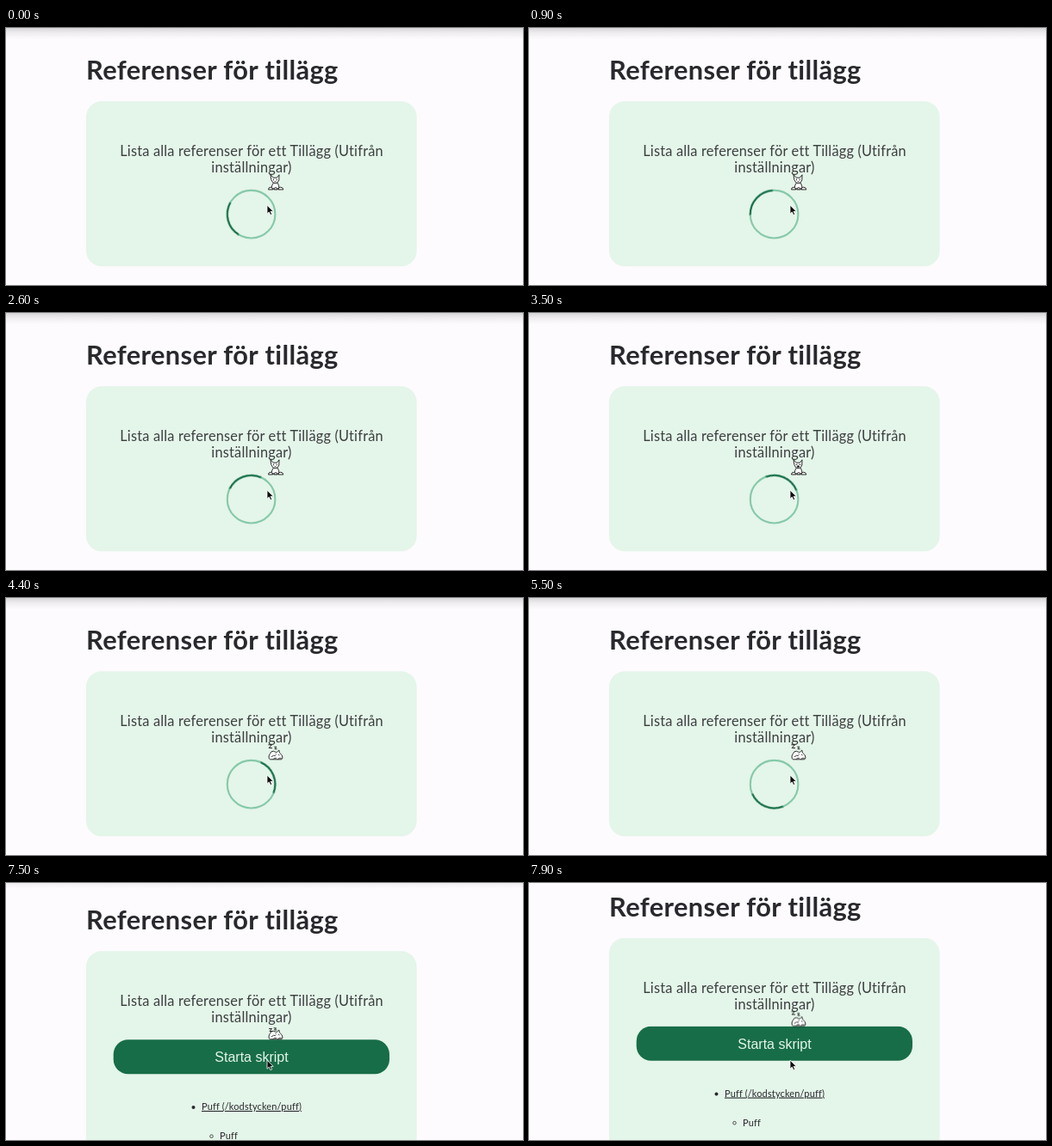
Write an HTML page that moves like this. It is 600 px wide and 299 px high and loops after 8 s.

```html
<!DOCTYPE html>
<html lang="sv">
<head>
<meta charset="utf-8">
<title>Referenser för tillägg</title>
<style>
  html, body { margin: 0; width: 100%; height: 100%; overflow: hidden; background: #fdfbfe; }
  svg { display: block; width: 600px; height: 299px; }
  text { font-family: Lato, sans-serif; letter-spacing: .012em; fill: #29292d; }
  .title { font-size: 30.8px; font-weight: 700; }
  .lead { font-size: 16.35px; text-anchor: middle; fill: #3c3f40; }
  .item { font-size: 11px; }
  .link { text-decoration: underline; }
  .button { font: 16px "Liberation Sans", Arial, sans-serif; letter-spacing: 0; text-anchor: middle; fill: #e6f5eb; }
  .ring { fill: none; stroke-width: 2.1; }
  #arc { transform-origin: 284.6px 216.7px; }
  .cat { fill: #fff; stroke: #161616; stroke-width: .9; stroke-linejoin: round; stroke-linecap: round; }
  .line { fill: none; }
</style>
</head>
<body>
<svg viewBox="0 0 600 299">
  <defs>
    <linearGradient id="shade" x2="0" y2="1">
      <stop offset="0" stop-color="#d6d5d8"/>
      <stop offset=".45" stop-color="#efedf0"/>
      <stop offset="1" stop-color="#fdfbfe"/>
    </linearGradient>
    <g id="sitting">
      <path d="M6.5 10Q4 13 4.2 17H13Q13.2 13 11 10Z"/>
      <path d="M3.2 .8 6.3 4.2H10.4L13 .8 12.8 7Q11.5 10.8 8.4 10.8T4 7Z"/>
      <path d="M.5 17.6Q.7 15.2 3.2 15.2 5.4 15.2 5.6 17.6ZM6.8 17.6Q7 15.6 9 15.6T11.2 17.6ZM12 17.6Q12.3 15 14.3 15.2 17.6 15.2 17.8 17.6Z"/>
    </g>
    <g id="curled">
      <path d="M1.2 16.5Q.3 13.8 2.2 11.5L4.2 8.6Q6.5 7.6 8.6 9.2L10.4 9.4 12.8 7 13.4 10Q17.2 12.5 17 16L15.8 17.8H3Z"/>
      <path class="line" d="M4.2 14.6Q6.2 12.4 8.6 13.4M9 11.6H9.4M12.2 12.2 13.2 12.8M6 17.5Q6.8 15.4 9.6 16.2M11.6 17.5Q12.6 15.4 15.4 16.2" stroke-width=".8"/>
    </g>
  </defs>

  <g id="page">
    <rect width="600" height="13" fill="url(#shade)"/>
    <text class="title" x="93" y="60">Referenser för tillägg</text>

    <rect id="shortCard" x="93" y="85.3" width="383.6" height="192" rx="18" fill="#e4f5e9"/>
    <rect id="longCard" x="93" y="85.3" width="383.6" height="300" rx="18" fill="#e4f5e9"/>
    <text class="lead" x="285" y="149">Lista alla referenser för ett Tillägg (Utifrån</text>
    <text class="lead" x="285" y="168.3">inställningar)</text>

    <g id="spinner">
      <circle class="ring" cx="284.6" cy="216.7" r="27.8" stroke="#86c9a9"/>
      <circle class="ring" id="arc" cx="284.6" cy="216.7" r="27.8" stroke="#176d47" pathLength="360" stroke-dasharray="88 272"/>
    </g>

    <g id="result">
      <rect x="124.7" y="188.3" width="320.3" height="40" rx="17" fill="#176d47"/>
      <text class="button" x="285" y="214">Starta skript</text>
      <circle cx="217.5" cy="267" r="2" fill="#29292d"/>
      <text class="item link" x="227" y="270">Puff (/kodstycken/puff)</text>
      <circle cx="238.5" cy="300.7" r="1.8" fill="none" stroke="#29292d" stroke-width=".8"/>
      <text class="item" x="248" y="304">Puff</text>
    </g>

    <g class="cat" transform="translate(304 170)">
      <g id="awake">
        <use href="#sitting"/>
        <path class="line" d="M6.6 6V7M10.2 6V7M7.8 8.9H9.2"/>
      </g>
      <g id="tired">
        <use href="#sitting"/>
        <path class="line" d="M6 6.3H7.2M9.8 6.3H11"/>
        <ellipse cx="8.4" cy="8.6" rx="1.1" ry=".9" fill="#161616"/>
      </g>
      <g id="sleepLow">
        <use href="#curled"/>
        <path class="line" d="M1.5 5.5H4.5L2 8.5H5M7 4.8H9.5L7.5 7H10"/>
      </g>
      <g id="sleepHigh">
        <use href="#curled"/>
        <path class="line" d="M.8 .8H4.4L1.2 4.5H4.6M7.6 3.2H9.9L7.9 5.7H10.2"/>
      </g>
    </g>
  </g>

  <path d="M303 206.2V216.2L305.3 214.1 306.9 217.6 308.7 216.8 307.1 213.4H310.3Z" fill="#0c0c0c" stroke="#fff" stroke-width=".8"/>
</svg>

<script>
const LOOP = 8000, SWAP = 5900, NAP = 4000, BREATH = 400;
const $ = id => document.getElementById(id);

// Each step is [time in ms, value]; the last value holds to the end of the loop.
function track(id, prop, steps, easing = 'linear') {
  const frames = [...steps, [LOOP, steps.at(-1)[1]]]
    .map(([time, value]) => ({ offset: time / LOOP, [prop]: value, easing }));
  $(id).animate(frames, { duration: LOOP, iterations: Infinity });
}

const show = (id, steps) => track(id, 'opacity', steps, 'step-end');
const turn = deg => `rotate(${deg}deg)`;
const shift = y => `translateY(${y}px)`;

show('shortCard', [[0, 1], [SWAP, 0]]);
show('spinner', [[0, 1], [SWAP, 0]]);
show('longCard', [[0, 0], [SWAP, 1]]);
show('result', [[0, 0], [SWAP, 1]]);

show('awake', [[0, 1], [3200, 0]]);
show('tired', [[0, 0], [3200, 1], [NAP, 0]]);

const breaths = Array.from({ length: (LOOP - NAP) / BREATH }, (_, i) => [NAP + i * BREATH, i % 2]);
show('sleepHigh', [[0, 0], ...breaths]);
show('sleepLow', [[0, 0], ...breaths.map(([time, high]) => [time, 1 - high])]);

track('arc', 'transform',
  [[0, 121], [900, 538], [2600, 1286], [4400, 2093], [SWAP, 2768]]
    .map(([time, deg]) => [time, turn(deg)]));

track('page', 'transform',
  [[0, 0], [7300, 0], [7400, -2], [7500, -6], [7600, -11], [7700, -16], [7800, -20], [7900, -21.5]]
    .map(([time, y]) => [time, shift(y)]));
</script>
</body>
</html>
```
